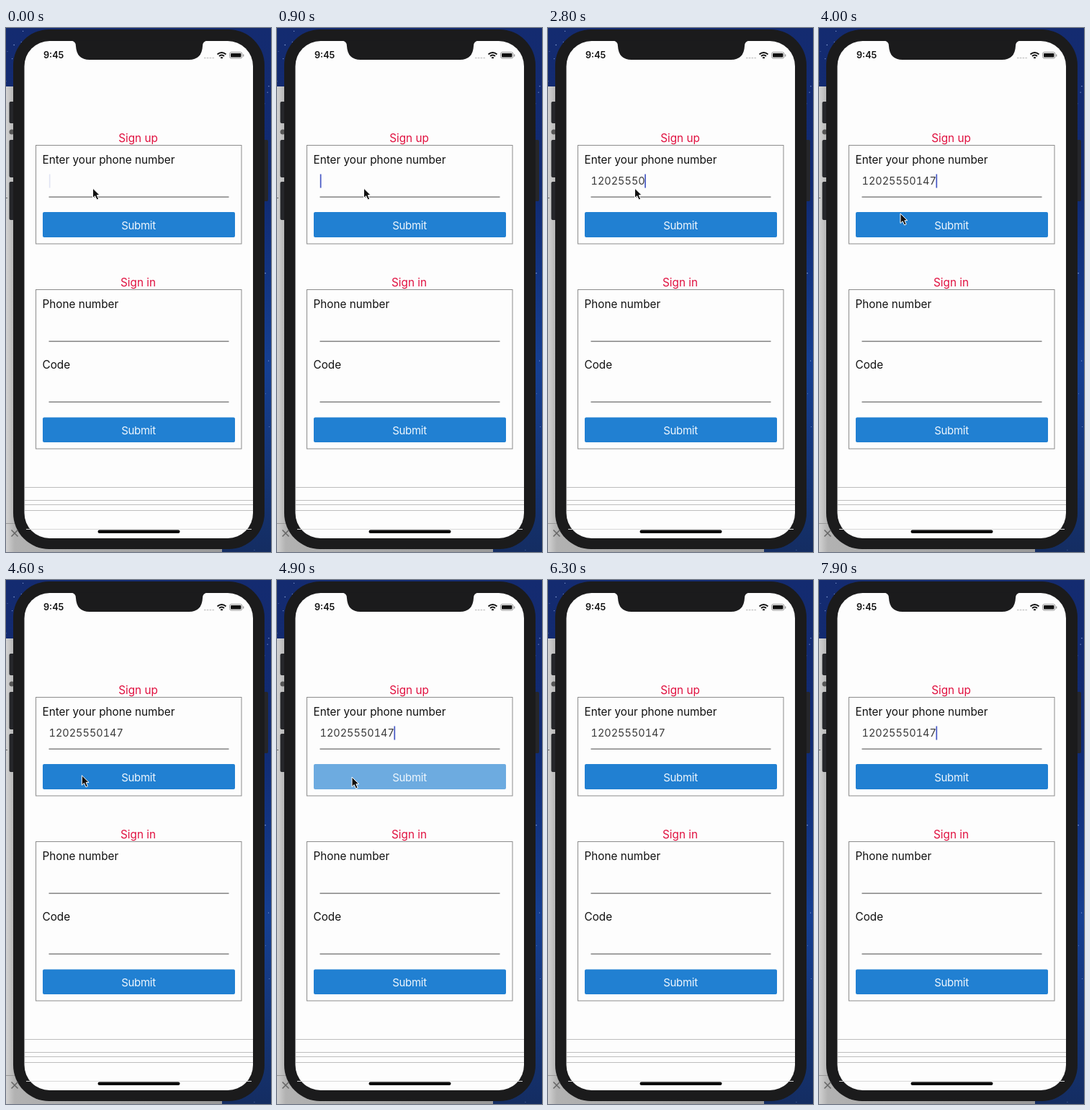
An HTML page for the animation above (8000 ms loop, 368 by 726 pixels).

```html
<!DOCTYPE html>
<html lang="en">
<head>
<meta charset="utf-8">
<title>Phone sign up</title>
<style>
html, body { margin: 0; width: 100%; height: 100%; overflow: hidden; background: #10286c; }
svg { display: block; width: 368px; height: 726px; }
text { font: 15.3px Inter, "Liberation Sans", sans-serif; fill: #111; }
.title { fill: #e0103f; text-anchor: middle; }
.btn text { font-size: 15px; letter-spacing: -.3px; fill: #eef6fd; text-anchor: middle; }
.btn rect { fill: #2180d2; }
.box { fill: none; stroke: #8c8c8c; }
#number { font-size: 14.5px; font-variant-numeric: tabular-nums; fill: #3a3a3a; }
.clock { font-size: 12.7px; font-weight: 600; }
</style>
</head>
<body>
<svg viewBox="0 0 368 726">
  <defs>
    <linearGradient id="sky" x2="0" y2="1">
      <stop stop-color="#142b70"/>
      <stop offset=".3" stop-color="#102a72"/>
      <stop offset=".65" stop-color="#153f92"/>
      <stop offset="1" stop-color="#142d62"/>
    </linearGradient>
    <linearGradient id="pane">
      <stop stop-color="#d2d2d2"/>
      <stop offset=".04" stop-color="#b2b2b2"/>
      <stop offset="1" stop-color="#999"/>
    </linearGradient>
  </defs>

  <rect width="368" height="726" fill="url(#sky)"/>
  <g id="stars" fill="#8fa6dc"></g>
  <path d="M0 81H300V726H0Z" fill="url(#pane)"/>
  <path d="M0 686.5H30" stroke="#999"/>
  <path d="M0 235.5H2" stroke="#666"/>
  <circle cx="8" cy="144" r="3.5" fill="#555"/>

  <g fill="#25262a">
    <rect x="4.5" y="102" width="8" height="30" rx="2"/>
    <rect x="4.5" y="155" width="8" height="52" rx="2"/>
    <rect x="4.5" y="213" width="8" height="53" rx="2"/>
    <rect x="356" y="155" width="8" height="85" rx="2"/>
  </g>
  <rect x="10" y="2" width="349" height="720" rx="50" fill="#1b1b1c"/>
  <path d="M7.5 695.5l9 9m0-9l-9 9" stroke="#666" stroke-width="1.5"/>
  <rect x="25.5" y="18" width="317.5" height="689" rx="35" fill="#fdfdfd"/>
  <path d="M90 17.5Q97 18 97 25Q98 44 116 44H254Q272 44 273 25Q273 18 280 17.5Z" fill="#1b1b1c"/>

  <text class="clock" x="52" y="42">9:45</text>
  <path d="M275 41.5H289" stroke="#c8c8c8" stroke-width="1.5" stroke-dasharray="2.5 1.3"/>
  <g fill="none" stroke="#111" stroke-width="1.9">
    <path d="M293.5 36.5Q299.500 31.500 305.500 36.500M296 39Q299.500 36 303 39"/>
    <path d="M298 41.200H301"/>
  </g>
  <rect x="310.500" y="33.500" width="17.500" height="8.500" rx="2.500" fill="none" stroke="#999"/>
  <rect x="312" y="35" width="14.500" height="5.500" rx="1" fill="#111"/>
  <path d="M329.700 36.500V39.500" stroke="#999" stroke-width="1.300"/>

  <text class="title" x="183.500" y="158">Sign up</text>
  <rect class="box" x="41.500" y="162.500" width="285.500" height="136.500"/>
  <text x="50.500" y="188">Enter your phone number</text>
  <text id="number" x="59.500" y="217"></text>
  <rect id="caret" y="202.500" width="1.700" height="19" fill="#4658c4"/>
  <g class="btn">
    <rect id="submit" x="51" y="255" width="267" height="35" rx="2"/>
    <text x="184" y="279">Submit</text>
  </g>

  <text class="title" x="183.500" y="358">Sign in</text>
  <rect class="box" x="41.500" y="362.500" width="285.500" height="220.500"/>
  <text x="50.500" y="388">Phone number</text>
  <text x="50.500" y="472">Code</text>
  <g class="btn">
    <rect x="51" y="539.500" width="267" height="34.500" rx="2"/>
    <text x="184" y="563">Submit</text>
  </g>

  <path d="M59.500 234.200H309.500M59.500 434.200H309.500M59.500 518.200H309.500" stroke="#6c6c6c" stroke-width="1.300"/>
  <path d="M26 636.500H343M26 654.500H343M26 660.500H343M26 668.500H343" stroke="#bdbdbd"/>
  <path d="M28 694.500H341" stroke="#d8d8d8"/>
  <rect x="127.500" y="695.500" width="114" height="4.500" rx="2.250" fill="#080808"/>

  <path id="pointer" d="M0 0V13.500L3.200 10.700L5.600 16L8.200 15L5.900 9.700H9.800Z" fill="#111" stroke="#fff"/>
</svg>
<script>
const LOOP = 8000, NUMBER = '12025550147';
const el = id => document.getElementById(id);
const number = el('number'), caret = el('caret'), submit = el('submit'), pointer = el('pointer');

// Linear interpolation through [time, value] pairs
function track(t, keys) {
  const i = keys.findIndex(k => k[0] > t);
  if (i < 0) return keys[keys.length - 1][1];
  if (!i) return keys[0][1];
  const [a, from] = keys[i - 1], [b, to] = keys[i];
  return from + (to - from) * (t - a) / (b - a);
}

let seed = 7;
const random = () => (seed = seed * 16807 % 2147483647) / 2147483647;
el('stars').innerHTML = Array.from({ length: 34 }, (_, i) => {
  const x = i % 4 ? 343 + random() * 25 : random() * 26;
  const y = random() * (i % 4 ? 726 : 80);
  return `<circle cx="${x}" cy="${y}" r="${0.4 + random() * 0.4}"/>`;
}).join('');

const blink = [[0, 1], [200, 1], [290, 0], [620, 0], [750, 1]];
const firstBlink = [[0, .15], [100, 0], [400, 0], [550, 1]];

function draw(now) {
  const t = Math.floor(now % LOOP / 100) * 100;
  const typed = Math.max(0, Math.min(NUMBER.length, Math.floor((t - 1000) / 225)));
  number.textContent = NUMBER.slice(0, typed);
  caret.setAttribute('x', 59.8 + (typed ? number.getComputedTextLength() - .8 : 0));
  caret.setAttribute('opacity', t < 1200 ? track(t, firstBlink) : t < 4000 ? 1 : track(t % 1000, blink));

  submit.setAttribute('opacity', track(t, [[4750, 1], [4900, .65], [5150, 1]]));
  const x = track(t, [[3500, 120.5], [4000, 113], [4700, 104], [5500, 104], [6100, -20]]);
  const y = track(t, [[3500, 222], [4000, 257], [4700, 273], [5500, 273], [6100, 330]]);
  pointer.setAttribute('transform', `translate(${x} ${y})`);
  requestAnimationFrame(draw);
}
requestAnimationFrame(draw);
</script>
</body>
</html>
```
